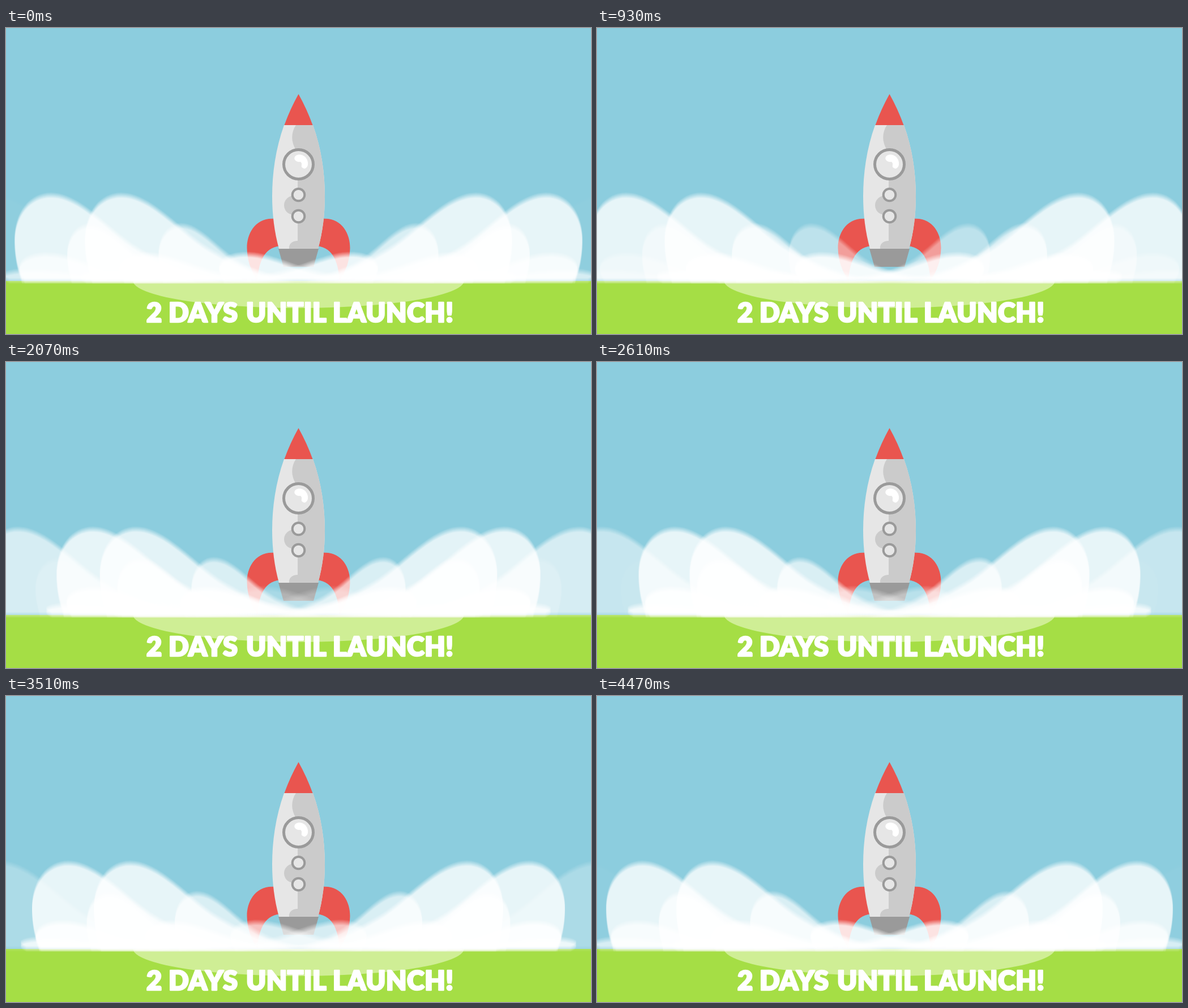
An HTML page with a canvas for the animation above (4.5 s loop, 1033 px wide and 542 px high).

```html
<!DOCTYPE html>
<html lang="en">
<head>
<meta charset="utf-8">
<title>Launch countdown</title>
<style>
html, body { margin: 0; width: 100%; height: 100%; overflow: hidden; background: #8ccdde; }
canvas { display: block; width: 1033px; height: 542px; }
</style>
</head>
<body>
<canvas id="stage" width="1033" height="542"></canvas>
<script>
const W = 1033, H = 542, GROUND = 448, MID = W / 2, LOOP = 4.5;
const ctx = document.getElementById('stage').getContext('2d');

// One puff outline: steep outer side, long tail toward the rocket. Base at y = 0.
const PUFF = new Path2D(
  'M13 0 C5 -20 0 -45 0 -71 C0 -120 28 -152 64 -152 ' +
  'C115 -152 165 -90 215 -58 C260 -30 320 -4 390 0 Z');

// x: birth place, half: half of the travel, start/span: drift times in seconds
const clouds = [
  { x: 166, half: 129, start: 1.8, span: 13, sx: 1, sy: 1, fade: [1.2, 2.1, 10.5, 13.6], alpha: 0.8 },
  { x: 340, half: 156, start: 0.4, span: 13, sx: 0.62, sy: 0.645, fade: [0.1, 1.4, 9, 11.8], alpha: 0.68 },
  { x: 408, half: 208, start: 2, span: 14, sx: 0.74, sy: 0.31, fade: [1.2, 4.2, 13, 15.5], alpha: 0.85 },
  { x: 222, half: 180, start: 3, span: 18, sx: 0.8, sy: 0.12, fade: [1, 2, 13, 15.5], alpha: 0.8 }
];

const clamp = v => Math.max(0, Math.min(1, v));

// Vertically blurred sprite made of stacked thin layers
function puffSprite(sx, sy) {
  const layers = 12, pad = 8;
  const c = document.createElement('canvas');
  c.width = Math.ceil(392 * sx) + 2;
  c.height = Math.ceil(152 * sy) + pad * 2;
  const g = c.getContext('2d');
  g.globalCompositeOperation = 'lighter';
  g.globalAlpha = 1 / layers;
  g.fillStyle = '#fff';
  for (let i = 0; i < layers; i++) {
    const dy = -5 + 10 * i / (layers - 1);
    g.setTransform(sx, 0, 0, sy, 1, c.height - pad + dy);
    g.fill(PUFF);
  }
  return { image: c, top: GROUND - c.height + pad };
}
clouds.forEach(c => { c.sprite = puffSprite(c.sx, c.sy); });

function shape(d, color) {
  ctx.fillStyle = color;
  ctx.fill(new Path2D(d));
}

function mirrored(draw) {
  draw();
  ctx.save();
  ctx.translate(W, 0);
  ctx.scale(-1, 1);
  draw();
  ctx.restore();
}

function ring(y, r, line) {
  ctx.beginPath();
  ctx.arc(MID, y, r, 0, Math.PI * 2);
  ctx.fillStyle = '#e6e6e6';
  ctx.fill();
  ctx.lineWidth = line;
  ctx.strokeStyle = '#9a9a9a';
  ctx.stroke();
}

function rocket() {
  mirrored(() => shape(
    'M474 338 C441 335 425 364 425.5 390 C426 411 432 430 444 447 ' +
    'C446 420 453 389 484 386 Z', '#e9554f'));
  shape('M491 172 C476 214 470 257 470 298 C470 331 474 362 482 391 H551 ' +
        'C559 362 563 331 563 298 C563 257 557 214 542 172 Z', '#e6e6e6');
  shape('M512 172 C503 185 503 202 512 216 H515 V298.5 ' +
        'A17 17 0 1 0 515 329.5 V377 C505 377 499 383 500 391 H551 ' +
        'C559 362 563 331 563 298 C563 257 557 214 542 172 Z', '#cbcbcb');
  shape('M516.5 117 Q502 143 491.5 172 H541.5 Q531 143 516.5 117 Z', '#e9554f');
  shape('M481 391 H552 L543 423 H490 Z', '#9a9a9a');
  ring(241.5, 26, 5);
  shape('M510 228 C515 221 531 224 533 238 C534 246 529 251 524 248 ' +
        'C519 245 525 241 520 237 C514 238 507 234 510 228 Z', '#fff');
  ring(295.5, 10.8, 4);
  ring(333.5, 10.8, 4);
}

function drift(t) {
  for (const c of clouds) {
    const [in0, in1, out0, out1] = c.fade;
    for (let age = t; age < out1; age += LOOP) {
      const a = clamp((age - in0) / (in1 - in0)) * clamp((out1 - age) / (out1 - out0));
      if (a <= 0) continue;
      const p = clamp((age - c.start) / c.span);
      const x = c.x - c.half * (1 - Math.cos(Math.PI * p));
      ctx.globalAlpha = a * c.alpha;
      ctx.drawImage(c.sprite.image, x - 1, c.sprite.top);
    }
  }
  ctx.globalAlpha = 1;
}

function caption() {
  ctx.font = '900 47px Lato, Inter, sans-serif';
  ctx.letterSpacing = '0.5px';
  ctx.textBaseline = 'alphabetic';
  ctx.fillStyle = ctx.strokeStyle = '#fff';
  ctx.lineWidth = 2.6;
  ctx.lineJoin = 'round';
  const words = [['2', 248], ['DAYS', 287], ['UNTIL', 424], ['LAUNCH!', 577]];
  for (const [word, x] of words) {
    ctx.fillText(word, x, 521);
    ctx.strokeText(word, x, 521);
  }
}

function frame(now) {
  const t = (now / 1000) % LOOP;
  ctx.fillStyle = '#8ccdde';
  ctx.fillRect(0, 0, W, H);
  ctx.fillStyle = '#a5de45';
  ctx.fillRect(0, GROUND, W, H - GROUND);
  ctx.beginPath();
  ctx.ellipse(MID, GROUND, 292, 48, 0, 0, Math.PI);
  ctx.fillStyle = '#cfee95';
  ctx.fill();
  rocket();
  mirrored(() => drift(t));
  caption();
}

const begin = performance.now();
function tick() {
  frame(performance.now() - begin);
  requestAnimationFrame(tick);
}
tick();
</script>
</body>
</html>
```
